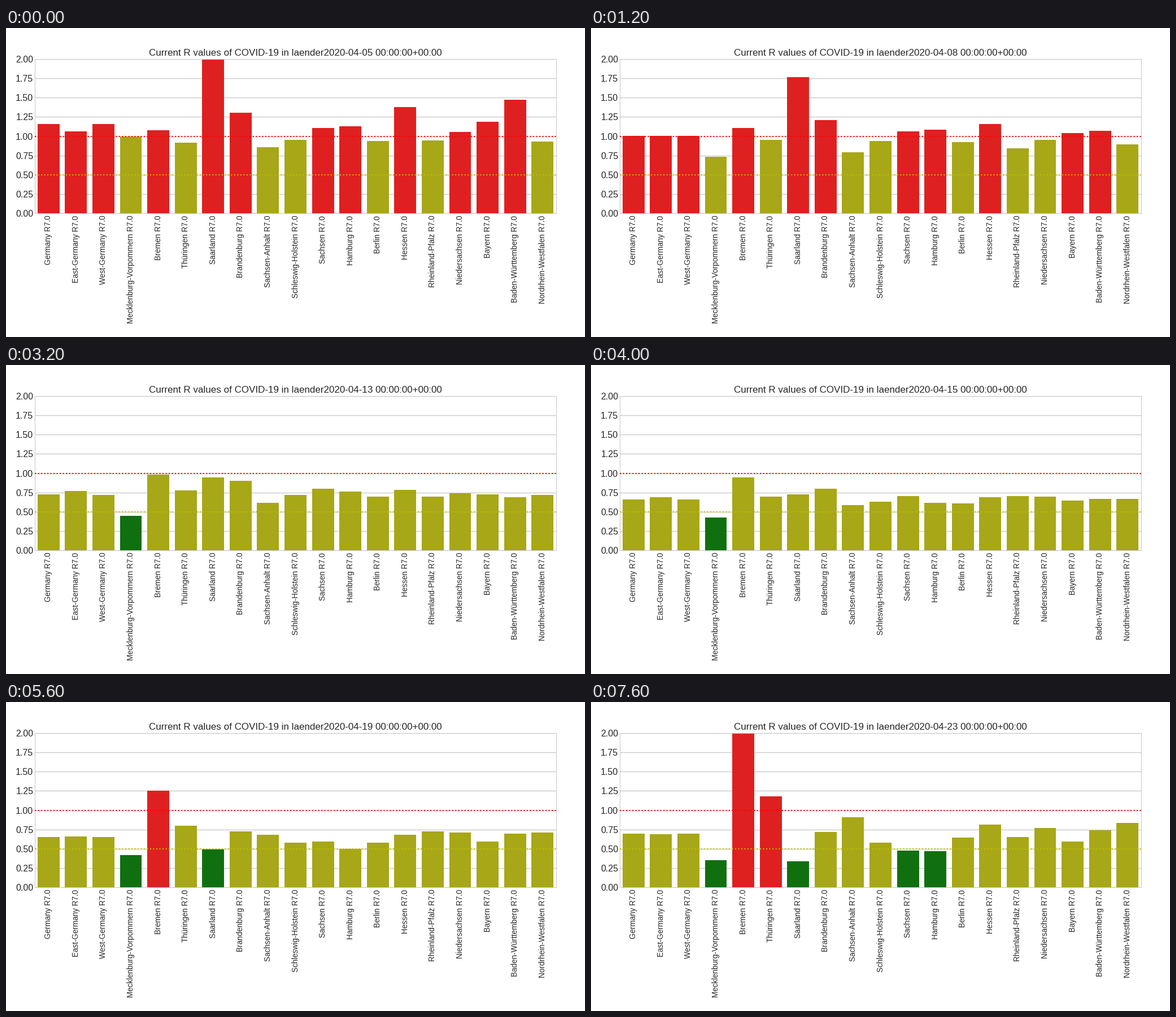
These frames come from a looping animation (1025x547 px, 8000 ms). A matplotlib script:

```python
import numpy as np
import matplotlib.pyplot as plt
from matplotlib.animation import FuncAnimation

W, H, DPI = 1025, 547, 72
LEFT, RIGHT, TOP, BOTTOM = 51, 974, 55, 328.3
RED, OLIVE, GREEN = "#df2020", "#a7a718", "#107010"
INK, GRID = "0.15", "0.8"

DAYS = [*range(5, 23), 22, 23]
STEPS = np.arange(len(DAYS))

# The national curve falls, bottoms out and recovers a little
NATIONAL = np.interp(STEPS, [0, 3, 5, 8, 12, 16, 19],
                     [1.155, 1.003, .905, .725, .60, .71, .70])

# Each region follows that curve, drifting between its own values here
ANCHORS = [0, 5, 12, 19]
REGIONS = {
    "Germany": NATIONAL[ANCHORS],
    "East-Germany": (1.065, .97, .615, .69),
    "West-Germany": (1.16, .90, .60, .70),
    "Mecklenburg-Vorpommern": (.998, .565, .405, .355),
    "Bremen": (1.08, 1.13, .905, 2.02),
    "Thüringen": (.92, .985, .615, 1.18),
    "Saarland": (2.4, 1.35, .515, .34),
    "Brandenburg": (1.305, 1.145, .695, .72),
    "Sachsen-Anhalt": (.86, .755, .555, .91),
    "Schleswig-Holstein": (.95, .93, .545, .58),
    "Sachsen": (1.11, 1.035, .605, .475),
    "Hamburg": (1.13, 1.06, .475, .47),
    "Berlin": (.94, .92, .52, .645),
    "Hessen": (1.38, 1.02, .595, .815),
    "Rheinland-Pfalz": (.945, .775, .715, .655),
    "Niedersachsen": (1.055, .895, .655, .77),
    "Bayern": (1.19, .94, .56, .595),
    "Baden-Württemberg": (1.475, .805, .645, .74),
    "Nordrhein-Westfalen": (.935, .87, .625, .84),
}


def curve(values):
    drift = np.array(values) - NATIONAL[ANCHORS]
    return NATIONAL + np.interp(STEPS, ANCHORS, drift)


def color_for(r):
    return RED if r > 1 else OLIVE if r >= .5 else GREEN


curves = np.array([curve(values) for values in REGIONS.values()])
slots = range(len(REGIONS))

plt.rcParams["font.family"] = "Liberation Sans"
fig = plt.figure(figsize=(W / DPI, H / DPI), dpi=DPI, facecolor="white")
ax = fig.add_axes([LEFT / W, 1 - BOTTOM / H,
                   (RIGHT - LEFT) / W, (BOTTOM - TOP) / H])

ax.set_axisbelow(True)
ax.grid(axis="y", color=GRID, lw=1.4)
for spine in ax.spines.values():
    spine.set(color=GRID, linewidth=1.1)
bars = ax.bar(slots, curves[:, 0], width=.8, linewidth=0)
for level, color in ((1, "r"), (.5, "y")):
    ax.axhline(level, color=color, ls=":", lw=2.08, zorder=3)

ax.set_xlim(-.5, len(REGIONS) - .5)
ax.set_ylim(0, 2)
ax.set_yticks(np.arange(0, 2.01, .25))
ax.set_xticks(slots, [f"{name} R7.0" for name in REGIONS], rotation=90)
ax.tick_params(length=0, labelcolor=INK)
ax.tick_params(axis="x", labelsize=13.5, pad=3.5)
ax.tick_params(axis="y", labelsize=16, pad=2.7)
title = ax.set_title("", fontsize=17.05, color=INK, pad=6)


def draw(step):
    for bar, r in zip(bars, curves[:, step]):
        bar.set_height(r)
        bar.set_facecolor(color_for(r))
    title.set_text("Current R values of COVID-19 in laender"
                   f"2020-04-{DAYS[step]:02d} 00:00:00+00:00")
    return [*bars, title]


anim = FuncAnimation(fig, draw, frames=len(DAYS), interval=400,
                     repeat=True, repeat_delay=0, blit=False)
plt.show()
```
